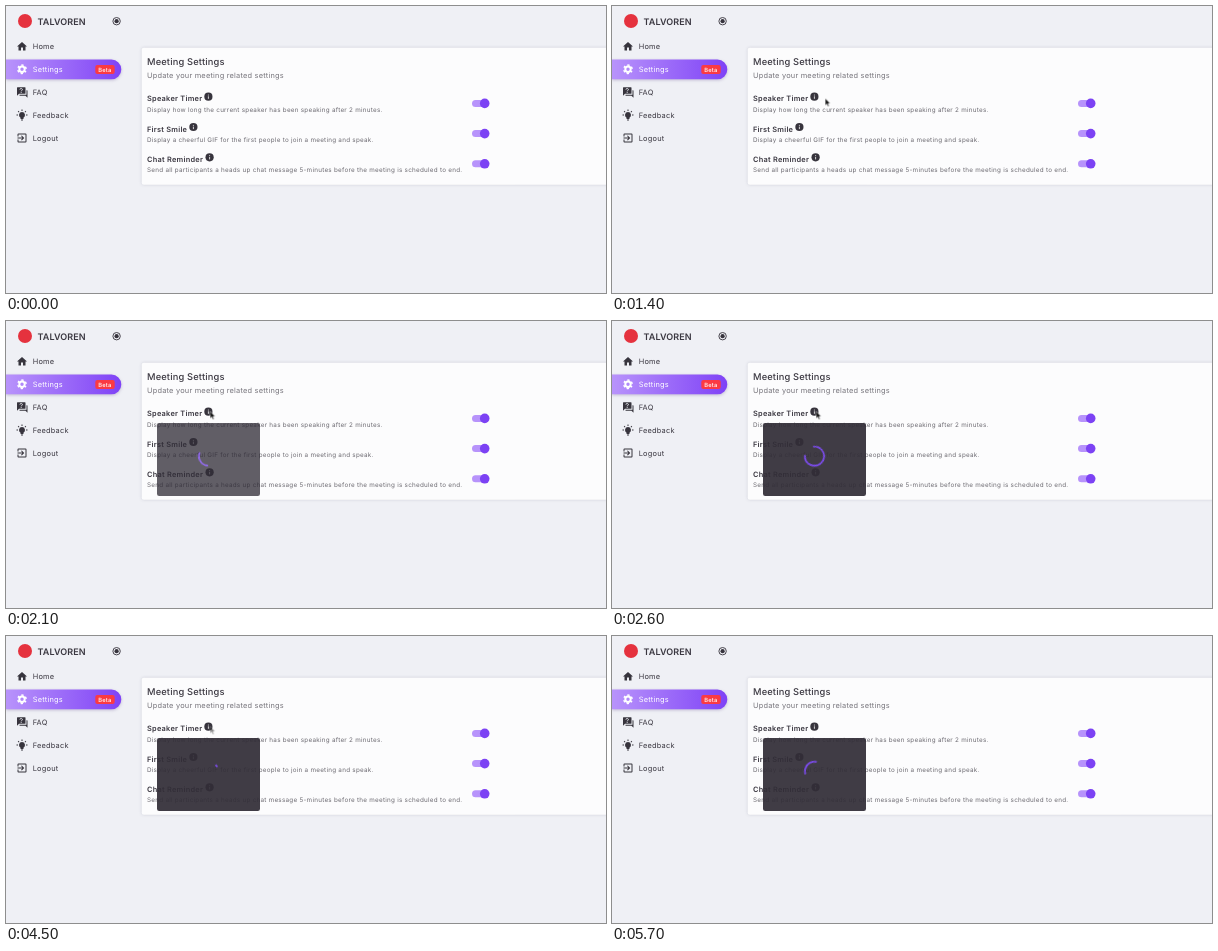
Recreate the animation shown at these times as an HTML page. Size 600x287 px, loop 5800 ms.

```html
<!DOCTYPE html>
<html lang="en">
<head>
<meta charset="utf-8">
<title>Meeting settings</title>
<style>
  html, body { margin: 0; width: 100%; height: 100%; overflow: hidden; background: #eff0f5; }
  svg { display: block; width: 100%; height: 100%; }
  text { font-family: Inter, "Open Sans", sans-serif; fill: #3a3740; text-rendering: geometricPrecision; }
  .brand { font-size: 9px; font-weight: 600; letter-spacing: .01em; }
  .nav { font-size: 7.4px; letter-spacing: .03em; }
  .title { font-size: 9.3px; font-weight: 500; letter-spacing: .0165em; }
  .subtitle { font-size: 7.4px; letter-spacing: .029em; fill: #77757c; }
  .name { font-size: 7.4px; font-weight: 600; letter-spacing: .034em; }
  .note { font-size: 6.3px; letter-spacing: .042em; fill: #6c6a71; }
  .badge { font-size: 5.8px; font-weight: 500; letter-spacing: .03em; }
  .light { fill: #fff; }
  .icon { fill: #37343d; }
  .card { filter: drop-shadow(0 .5px 1.5px rgba(40, 40, 70, .17)); }
  .selected { filter: drop-shadow(0 1px 1.5px rgba(60, 30, 110, .25)); }

  /* Keyframes are sampled by script through --t, in milliseconds. */
  .tooltip, .cursor, .arc { animation-play-state: paused; animation-iteration-count: infinite; }
  .tooltip, .cursor { animation-duration: 5.8s; animation-delay: calc(var(--t) * -1ms); animation-timing-function: linear; }
  .tooltip { animation-name: appear; }
  .cursor { animation-name: move, visible; }
  .arc {
    fill: none; stroke: #7d4cf0; stroke-width: 3.6;
    animation-name: spin, dash;
    animation-duration: 1.4s;
    animation-timing-function: linear, ease-in-out;
    animation-delay: calc((var(--t) + 1000) * -1ms);
  }
  @keyframes appear {
    0%, 32.07% { opacity: 0; }
    37.07%, 100% { opacity: 1; }
  }
  @keyframes move {
    0%, 6.9% { transform: translate(334px, 226px); }
    8.62% { transform: translate(272px, 152px); }
    10.34% { transform: translate(226px, 108px); }
    12.07%, 15.5% { transform: translate(210px, 96px); }
    24.14%, 25.86% { transform: translate(213.3px, 92.4px); }
    31.03%, 100% { transform: translate(204.2px, 90.4px); }
  }
  @keyframes visible {
    0%, 6.8% { opacity: 0; }
    6.85%, 75.86% { opacity: 1; }
    79.31%, 100% { opacity: 0; }
  }
  @keyframes spin { to { transform: rotate(360deg); } }
  @keyframes dash {
    0% { stroke-dasharray: 1px, 200px; stroke-dashoffset: 0; }
    50% { stroke-dasharray: 100px, 200px; stroke-dashoffset: -15px; }
    100% { stroke-dasharray: 100px, 200px; stroke-dashoffset: -125px; }
  }
</style>
</head>
<body>
<svg viewBox="0 0 600 287">
  <defs>
    <linearGradient id="violet">
      <stop offset="0" stop-color="#b893fb"/>
      <stop offset="1" stop-color="#7f42f6"/>
    </linearGradient>
    <g id="info">
      <circle r="4.1" fill="#37343d"/>
      <path d="M0-2.1V-1.2M0-.4V2.1" stroke="#fff" stroke-width=".8"/>
    </g>
    <g id="switch">
      <rect x="466" y="-3.5" width="16.5" height="7" rx="3.5" fill="#b793fb"/>
      <circle cx="478.7" r="4.8" fill="#7c42f4"/>
    </g>
  </defs>

  <circle cx="19" cy="15" r="7" fill="#e5323e"/>
  <text class="brand" x="31.5" y="18.5">TALVOREN</text>
  <circle cx="110.6" cy="15.2" r="3.7" fill="none" stroke="#37343d" stroke-width=".9"/>
  <circle cx="110.6" cy="15.2" r="2.1" class="icon"/>

  <path class="selected" d="M0 53.5H105.4a9.9 9.9 0 0 1 0 19.8H0Z" fill="url(#violet)"/>
  <rect x="89.3" y="58.9" width="19.4" height="9.2" rx="2" fill="#fb3a43"/>
  <text class="badge light" x="92.2" y="65.7">Beta</text>

  <g class="icon">
    <path transform="translate(10 34.5) scale(.5)" d="M10 20v-6h4v6h5v-8h3L12 3 2 12h3v8z"/>
    <g transform="translate(16 63.3) scale(.5)" fill="none" stroke="#fff">
      <circle r="5.4" stroke-width="4"/>
      <circle r="8.4" stroke-width="3" stroke-dasharray="4.4 4.396" stroke-dashoffset="2.2" transform="rotate(30)"/>
    </g>
    <g transform="translate(10 80.2) scale(.5)">
      <path d="M18 15H6L2 19V3a1 1 0 0 1 1-1H18a1 1 0 0 1 1 1V14a1 1 0 0 1-1 1M23 9V23L19 19H8a1 1 0 0 1-1-1V17H21V8H22a1 1 0 0 1 1 1"/>
      <path d="M7.8 6.6C8 3.8 13 4 12.8 6.8 12.6 8.4 10.4 8.4 10.4 10.4M10.4 11.6V13.4" fill="none" stroke="#eff0f5" stroke-width="1.8"/>
    </g>
    <path transform="translate(10 103.1) scale(.5)" d="M12 6a6 6 0 0 1 3 11.2V19a1 1 0 0 1-1 1H10a1 1 0 0 1-1-1V17.2A6 6 0 0 1 12 6M14 21v1a1 1 0 0 1-1 1H11a1 1 0 0 1-1-1V21ZM20 11h3v2h-3ZM1 11h3v2H1ZM13 1v3h-2V1ZM4.9 3.5 7 5.6 5.6 7 3.5 4.9ZM17 5.6 19.1 3.5 20.5 4.9 18.4 7Z"/>
    <path transform="translate(10 125.9) scale(.5)" d="M10.1 15.6 11.5 17l5-5-5-5-1.4 1.4L12.7 11H3v2h9.7zM19 3H5a2 2 0 0 0-2 2v4h2V5h14v14H5v-4H3v4a2 2 0 0 0 2 2h14a2 2 0 0 0 2-2V5a2 2 0 0 0-2-2z"/>
  </g>
  <g class="nav">
    <text x="26.7" y="43.3">Home</text>
    <text x="26.7" y="66.1" class="light">Settings</text>
    <text x="26.7" y="89">FAQ</text>
    <text x="26.7" y="111.9">Feedback</text>
    <text x="26.7" y="134.7">Logout</text>
  </g>

  <rect class="card" x="135.7" y="41.8" width="470" height="137" rx="2" fill="#fcfcfd"/>
  <text class="title" x="141" y="58.7">Meeting Settings</text>
  <text class="subtitle" x="141" y="71.6">Update your meeting related settings</text>

  <text class="name" x="141" y="95.4">Speaker Timer</text>
  <text class="note" x="141" y="105.8">Display how long the current speaker has been speaking after 2 minutes.</text>
  <use href="#info" x="202.4" y="90.7"/>
  <use href="#switch" y="97.4"/>

  <text class="name" x="141" y="125.7">First Smile</text>
  <text class="note" x="141" y="136.1">Display a cheerful GIF for the first people to join a meeting and speak.</text>
  <use href="#info" x="187.4" y="121"/>
  <use href="#switch" y="127.6"/>

  <text class="name" x="141" y="156">Chat Reminder</text>
  <text class="note" x="141" y="166.4">Send all participants a heads up chat message 5-minutes before the meeting is scheduled to end.</text>
  <use href="#info" x="203.6" y="151.3"/>
  <use href="#switch" y="157.8"/>

  <g class="tooltip">
    <rect x="151" y="102" width="103" height="73" rx="2.2" fill="#322e37" fill-opacity=".93"/>
    <g transform="translate(202.5 135.2) scale(.475)"><circle class="arc" r="20.2"/></g>
  </g>
  <path class="cursor" d="M0 0V6.9L1.6 5.5 2.7 8 3.8 7.5 2.7 5.1H4.8Z" fill="#111" stroke="#fff" stroke-width=".4"/>
</svg>
<script>
  const LOOP = 5800, STEP = 100;
  const root = document.documentElement;

  function draw() {
    const time = performance.now() % LOOP;
    root.style.setProperty('--t', Math.floor(time / STEP) * STEP);
    requestAnimationFrame(draw);
  }
  draw();
</script>
</body>
</html>
```
